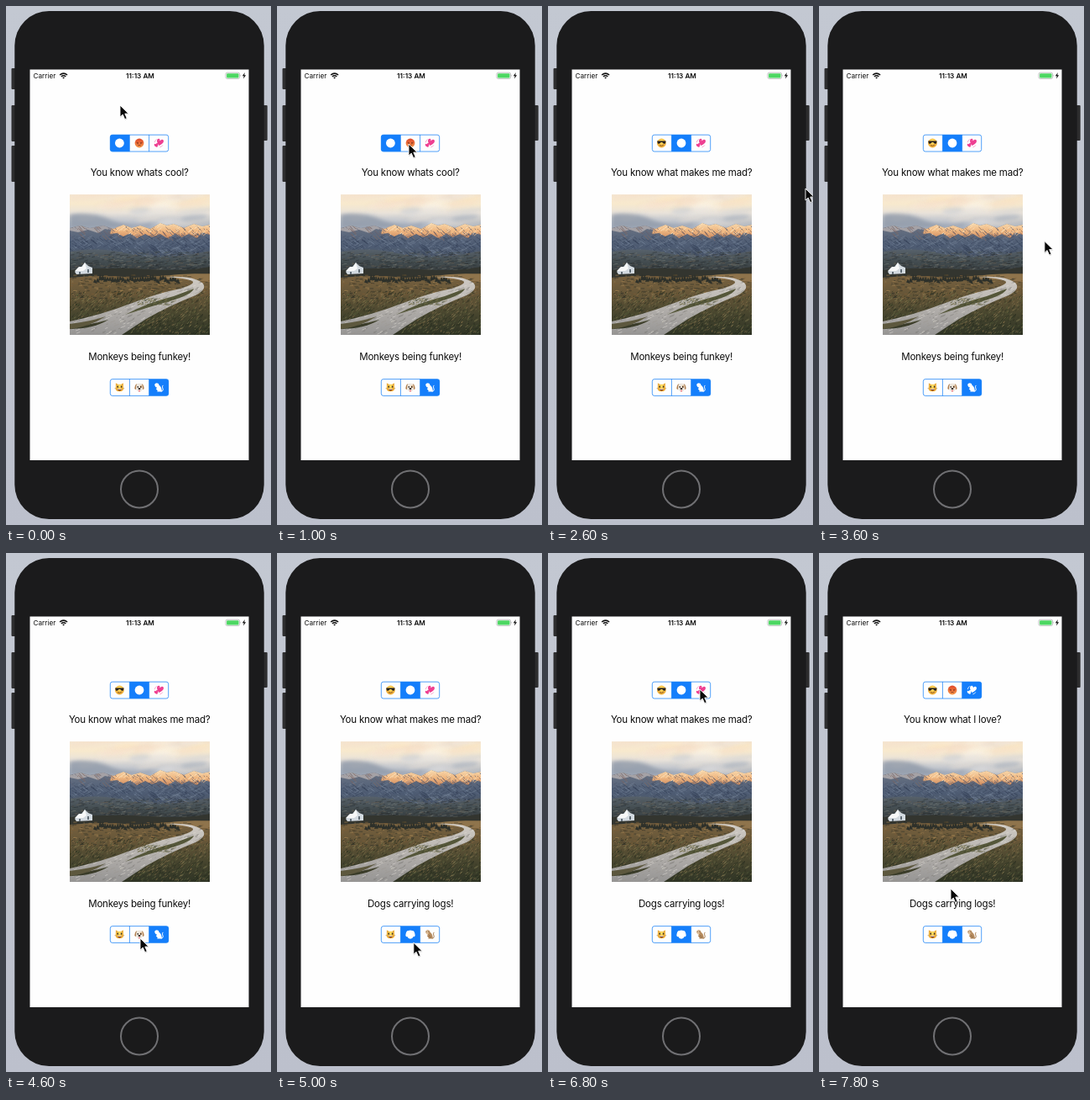
Animation of 316 by 617 pixels, one loop 8 s. Source, as an HTML page with a canvas:

```html
<!DOCTYPE html>
<html lang="en">
<head>
<meta charset="utf-8">
<title>Segmented pickers</title>
<style>
html, body { margin: 0; width: 100%; height: 100%; overflow: hidden; background: #bfc4cf; }
svg, canvas { position: absolute; left: 0; top: 0; display: block; }
#photo { left: 76px; top: 224px; }
text { font-family: Inter, Roboto, sans-serif; fill: #0c0c0c; }
.label { font-size: 11.5px; letter-spacing: -.2px; text-anchor: middle; }
.status { font-size: 8.2px; }
.cell { fill: #fefefe; }
.on .cell { fill: #147efb; }
.on .base { fill: #fff; stroke: none; }
.on .tail { stroke: #fff; }
.on .detail { display: none; }
</style>
</head>
<body>
<svg width="316" height="617" viewBox="0 0 316 617">
  <defs>
    <linearGradient id="backdrop" x2="0" y2="1">
      <stop stop-color="#c3c8d2"/><stop offset="1" stop-color="#bcc0cc"/>
    </linearGradient>
    <radialGradient id="yellow" cy=".35">
      <stop stop-color="#ffe368"/><stop offset="1" stop-color="#f0b03a"/>
    </radialGradient>
    <linearGradient id="red" x2="0" y2="1">
      <stop stop-color="#e0472b"/><stop offset="1" stop-color="#f79a4c"/>
    </linearGradient>
    <clipPath id="pill"><rect width="70" height="20" rx="3"/></clipPath>
    <path id="heart" d="M0 4C-6-.5-4-4.5-1.7-3.8Q-.4-3.4 0-2Q.4-3.4 1.7-3.8C4-4.5 6-.5 0 4Z"/>
  </defs>
  <rect width="316" height="617" fill="url(#backdrop)"/>

  <g fill="#2d2d2e">
    <rect x="6.5" y="74" width="8" height="25" rx="1"/>
    <rect x="6.5" y="118" width="8" height="43" rx="1"/>
    <rect x="6.5" y="166" width="8" height="43" rx="1"/>
    <rect x="304" y="118" width="7.7" height="42" rx="1"/>
  </g>
  <rect x="10.3" y="6" width="297.4" height="604" rx="41" fill="#1b1b1c"/>
  <rect x="28.5" y="75.5" width="261" height="464.5" fill="#fefefe"/>
  <circle cx="159" cy="574.5" r="22" fill="#1a1a1b" stroke="#707073" stroke-width="2"/>

  <text class="status" x="32.5" y="86">Carrier</text>
  <g transform="translate(68.6 86.5)" fill="none" stroke="#111" stroke-width="1.5">
    <path d="M-4.5-4.5Q0-8.3 4.5-4.5M-2.7-2.6Q0-5 2.7-2.6"/>
    <path d="M0 0L-1.4-1.4Q0-2.6 1.4-1.4Z" fill="#111" stroke="none"/>
  </g>
  <text class="status" x="160" y="86" text-anchor="middle" font-weight="600">11:13 AM</text>
  <rect x="262" y="79.2" width="16.6" height="7.2" rx="1.8" fill="#fff" stroke="#a7a9a9" stroke-width=".7"/>
  <rect x="263.1" y="80.2" width="14.4" height="5.2" rx="1" fill="#4cd762"/>
  <path d="M279.5 81.5q1.4 1.3 0 2.6z" fill="#a7a9a9"/>
  <path d="M284.8 79l-3 4.3h1.9l-.7 3.3 3.1-4.4h-1.9z" fill="#111"/>

  <text class="label" id="moodText" x="159.2" y="202.2"/>
  <text class="label" id="petText" x="159.2" y="421.4"/>

  <g id="moods" transform="translate(124 153)"><g clip-path="url(#pill)">
    <g>
      <rect class="cell" width="23.5" height="20"/>
      <g transform="translate(11.4 10)">
        <circle class="base" r="5.4" fill="url(#yellow)"/>
        <g class="detail">
          <path d="M-5.3-2.4H5.3L4.4.4Q2.4 1.6.8-.9H-.8Q-2.4 1.6-4.4.4Z" fill="#25201d"/>
          <path d="M-2.4 2.6Q.3 4.2 2.5 2.1" fill="none" stroke="#734019" stroke-width=".8"/>
        </g>
      </g>
    </g>
    <g>
      <rect class="cell" x="23.3" width="23.5" height="20"/>
      <g transform="translate(35 10)">
        <circle class="base" r="5.4" fill="url(#red)"/>
        <g class="detail" stroke="#6d2514" fill="none">
          <path d="M-3.4-1L-1-.1M3.4-1L1-.1M-1.7 3Q0 1.8 1.7 3" stroke-width=".7"/>
          <path d="M-2 .2v1M2 .2v1" stroke-width="1"/>
        </g>
      </g>
    </g>
    <g>
      <rect class="cell" x="46.7" width="23.5" height="20"/>
      <g transform="translate(58.2 10)" fill="#ee3f91">
        <use class="base" href="#heart" transform="translate(1.4 -.9) rotate(14)"/>
        <use class="base" href="#heart" transform="translate(-2.8 2.6) rotate(-18) scale(.6)"/>
        <path class="tail" d="M-4.9-.8Q-4.4-3.6-2.6-4.6M4.6 2.4Q3.6 4.5 1.2 4.8" fill="none" stroke="#f590bf" stroke-width=".8"/>
        <path class="detail" d="M.2-3q.8-1 1.8-.3" fill="none" stroke="#ffb4d7" stroke-width=".8"/>
      </g>
    </g>
  </g></g>

  <g id="pets" transform="translate(124 443.5)"><g clip-path="url(#pill)">
    <g>
      <rect class="cell" width="23.5" height="20"/>
      <g transform="translate(11.4 10)">
        <path class="base" d="M-4.6-1L-4.5-5.2L-1.8-3.8H1.8L4.5-5.2L4.6-1Q6 4.8 0 4.8Q-6 4.8-4.6-1Z" fill="url(#yellow)"/>
        <g class="detail">
          <path d="M-3.8-4.2L-3.7-2.5L-2.6-3.2ZM3.8-4.2L3.7-2.5L2.6-3.2Z" fill="#d18a53"/>
          <ellipse cx="-2.2" cy="-.8" rx=".8" ry="1.1" fill="#30251b"/>
          <ellipse cx="2.2" cy="-.8" rx=".8" ry="1.1" fill="#30251b"/>
          <path d="M-2.5 1.7H2.5Q1.8 4 0 4Q-1.8 4-2.5 1.7Z" fill="#77351f"/>
          <path d="M-2 1.8H2V2.4H-2Z" fill="#fff"/>
          <path d="M-5.9 1l2 .3M5.9 1l-2 .3" stroke="#8d6738" stroke-width=".4"/>
        </g>
      </g>
    </g>
    <g>
      <rect class="cell" x="23.3" width="23.5" height="20"/>
      <g transform="translate(35 10)">
        <path class="base" d="M-2.6-4.4Q0-5.5 2.6-4.4Q5-4.4 5.7 1Q5.3 3.2 3.7 2.6Q2.6 5.2 0 5.2Q-2.6 5.2-3.7 2.6Q-5.3 3.2-5.7 1Q-5-4.4-2.6-4.4Z" fill="#eee8df"/>
        <g class="detail">
          <path d="M-2.9-4.2Q-5-4-5.6 1Q-5 3-4 2Q-4.4-1-2.9-4.2ZM2.9-4.2Q5-4 5.6 1Q5 3 4 2Q4.4-1 2.9-4.2Z" fill="#b07f50"/>
          <ellipse cx="2" cy="-1" rx="1.4" ry="1.8" fill="#d9b287"/>
          <circle cx="-1.8" cy="-.6" r=".8" fill="#241b17"/>
          <circle cx="1.8" cy="-.6" r=".8" fill="#241b17"/>
          <ellipse cy="1.5" rx="1.4" ry=".9" fill="#241b17"/>
          <path d="M-.8 3.2h1.6v1.2q-.8 1-1.6 0z" fill="#e96572"/>
        </g>
      </g>
    </g>
    <g>
      <rect class="cell" x="46.7" width="23.5" height="20"/>
      <g transform="translate(58.2 10)">
        <path class="tail" d="M2.5 4.6Q5.8 4.4 4.8 1.4Q3.6-1 5-2.6" fill="none" stroke="#a87d52" stroke-width="1"/>
        <path class="base" d="M-5-3.4Q-4.6-5.4-2.2-5.3Q.3-5.1.3-2.7Q3.6-.6 3.6 4.9H-2L-1.4 3.7L-3.4 1.8L-2 .2Q-4.8-.4-5-3.4Z" fill="#b68c5f"/>
        <g class="detail">
          <ellipse cx="-2.9" cy="-2.4" rx="1.6" ry="2" fill="#e9c79f"/>
          <circle cx="-3.4" cy="-3" r=".4" fill="#2d2018"/>
          <circle cx="-2" cy="-3" r=".4" fill="#2d2018"/>
          <path d="M-.5.6Q1.5 2-1.8 2.8M.2 4.5Q.2 2.8 2 2.6" fill="none" stroke="#7a5636" stroke-width=".5"/>
        </g>
      </g>
    </g>
  </g></g>

  <g fill="none" stroke="#2588f7" stroke-width=".8">
    <path d="M147.4 153v20M170.6 153v20M147.4 443.5v20M170.6 443.5v20"/>
    <rect x="124.3" y="153.2" width="69.4" height="19.8" rx="2.6"/>
    <rect x="124.3" y="443.6" width="69.4" height="19.8" rx="2.6"/>
  </g>
</svg>
<canvas id="photo" width="167" height="167"></canvas>
<svg width="316" height="617" viewBox="0 0 316 617">
  <g id="cursor">
    <path d="M0 0V14L3.2 11L5.7 16.6L8.2 15.5L5.8 10H10.2Z" transform="translate(.4 1)" fill="#0003"/>
    <path d="M0 0V14L3.2 11L5.7 16.6L8.2 15.5L5.8 10H10.2Z" fill="#080808" stroke="#fff" stroke-width=".9"/>
  </g>
</svg>
<script>
const byId = id => document.getElementById(id);

function paintPhoto() {
  const ctx = byId('photo').getContext('2d');
  let seed = 7;
  const random = () => (seed = seed * 16807 % 2147483647) / 2147483647;
  const pick = list => list[Math.floor(random() * list.length)];
  const fill = (path, color) => { ctx.fillStyle = color; ctx.fill(new Path2D(path)); };
  const fade = (top, bottom, ...colors) => {
    const gradient = ctx.createLinearGradient(0, top, 0, bottom);
    colors.forEach((c, i) => gradient.addColorStop(i / (colors.length - 1), c));
    return gradient;
  };
  // Scatter short strokes of the given colours over a band; slope tilts them.
  const speckle = (count, x, y, w, h, colors, alpha, length = 2, slope = 0) => {
    ctx.globalAlpha = alpha;
    for (let i = 0; i < count; i++) {
      const left = x + random() * w, top = y + random() * h, run = 1 + random() * length;
      ctx.strokeStyle = pick(colors);
      ctx.beginPath();
      ctx.moveTo(left, top);
      ctx.lineTo(left + run, top + run * slope);
      ctx.stroke();
    }
    ctx.globalAlpha = 1;
  };
  const clouds = (count, y, h, colors) => {
    for (let i = 0; i < count; i++) {
      ctx.fillStyle = pick(colors);
      ctx.beginPath();
      ctx.ellipse(random() * 167, y + random() * h, 10 + random() * 18, 1.5 + random() * 3, -.12, 0, 7);
      ctx.fill();
    }
  };

  // Sky and clouds
  fill('M0 0H167V60H0Z', fade(0, 44, '#f5e6d2', '#f8e9cd', '#e9e3da', '#bcc1ca', '#a0acbf'));
  ctx.filter = 'blur(2px)';
  ctx.globalAlpha = .45;
  clouds(18, 0, 17, ['#ffe9ba', '#f6dcc6', '#fdf6ea', '#e9d9cc']);
  clouds(16, 19, 16, ['#e4e2e0', '#98a4b5', '#c6c9d0', '#f0e5d6']);
  ctx.globalAlpha = .8;
  fill('M0 24Q25 20 48 30T100 34L95 38L50 40H0Z', '#8f99a8');
  ctx.globalAlpha = 1;
  ctx.filter = 'none';

  // Mountains with sunlit snow
  const ridge = 'M0 40L12 37L24 40L40 37L52 41L64 36L74 40L84 37L96 41L108 34L116 37L124 35L136 40L148 35L158 38L167 36';
  const slopes = new Path2D(ridge + 'V92H0Z');
  ctx.fillStyle = fade(38, 86, '#6a7282', '#5a677c', '#4d5b72', '#505b68', '#414a52');
  ctx.fill(slopes);
  ctx.save();
  ctx.clip(slopes);
  fill('M0 34H60L52 43L42 41L34 46L22 42L10 45L0 43Z', '#a5a2a6');
  fill('M52 32H167V48L158 45L152 52L142 47L133 51L126 46L118 53L108 47L98 51L90 47L80 52L72 46L64 50L56 46L48 47Z', fade(34, 52, '#f8dcb2', '#efb781', '#d08e62'));
  speckle(120, 0, 37, 167, 13, ['#5e6273', '#6f6268', '#84685f'], .7, 5, 1);
  speckle(90, 55, 36, 112, 13, ['#fbe0b8', '#f3c08a'], .8, 5, -.8);
  speckle(330, 0, 50, 167, 24, ['#323f56', '#75839a', '#5f6d84', '#2c394e'], .5, 8, .7);
  speckle(200, 0, 50, 167, 24, ['#3a475e', '#7b879b', '#4a566d'], .5, 7, -.5);
  ctx.restore();
  fill('M0 68Q35 62 72 71T167 67V98H0Z', fade(64, 96, '#59636d', '#434c50', '#303536'));
  speckle(520, 0, 69, 167, 25, ['#23292d', '#7c807b', '#4d5858', '#2a2d2c', '#665f52'], .5, 6, -.15);

  // Tree line and fields
  fill('M0 90Q50 86 95 89T167 86V105H0Z', '#33352f');
  fill('M0 99Q40 95 78 99L118 96L167 94V167H0Z', fade(94, 167, '#7a6341', '#665638', '#47452e', '#2f3425'));
  fill('M112 97Q140 93 167 95V104Q140 100 112 101Z', '#8f744c');
  speckle(360, 0, 96, 167, 28, ['#a18150', '#463f2c', '#7c5e38', '#33342a'], .65, 4);
  speckle(1200, 0, 116, 167, 51, ['#1f261a', '#7f7a52', '#59623d', '#947a50', '#2c3222'], .6, 2, -.8);
  for (let x = 28; x < 128; x += 3) {
    fill(`M${x} ${102 + random() * 3}l2 -${4 + random() * 4}l3 ${4 + random() * 4}z`, '#2d302a');
  }

  // House
  fill('M6 92L10 87L14 86L18 81L22 85L27 87V94L8 95Z', '#d3dae0');
  fill('M6 91L11 86L15 86L18 81L20 88L16 91Z', '#f7f8f8');
  fill('M11 92h2v3h-2zM21 89h2v4h-2z', '#606b74');

  // Road with a grassy middle
  const road = 'M0 151Q38 143 72 130T132 112Q151 106 146 103Q137 99 113 98Q147 96 158 105Q165 112 150 120Q119 132 91 148L62 167H0V160Q28 160 46 149Q24 155 0 158Z';
  fill(road, fade(98, 167, '#cfcac3', '#c0bcb7', '#aaa7a4', '#969594'));
  ctx.save();
  ctx.clip(new Path2D(road));
  speckle(500, 0, 100, 160, 67, ['#e6e2dc', '#75746f', '#99948c'], .45, 5, -.4);
  ctx.restore();
  fill('M66 143Q92 129 124 121L148 112Q146 119 119 127Q94 134 66 143Z', '#55573a');
  fill('M0 154Q25 151 43 145Q22 158 0 160Z', '#5d583e');
  speckle(100, 80, 124, 44, 8, ['#3d432b', '#7c754c'], .55, 3, -.4);
}

const moodLines = ['You know whats cool?', 'You know what makes me mad?', 'You know what I love?'];
const petLines = ['Cats wearing hats!', 'Dogs carrying logs!', 'Monkeys being funkey!'];

// Pointer stops: time, x, y
const stops = [
  [0, 136, 118], [1000, 157, 164], [1400, 157, 164], [2400, 250, 202], [2600, 307, 217],
  [3200, 307, 217], [4400, 160, 458], [4800, 160, 458], [5400, 171, 478], [5800, 171, 478],
  [6800, 181, 162], [7000, 181, 162], [7800, 157, 399]
];

function pointerAt(time) {
  const next = stops.findIndex(stop => stop[0] >= time);
  if (next < 1) return stops[0].slice(1);
  const [t0, x0, y0] = stops[next - 1], [t1, x1, y1] = stops[next];
  const p = (time - t0) / (t1 - t0), eased = p * p * (3 - 2 * p);
  return [x0 + (x1 - x0) * eased, y0 + (y1 - y0) * eased];
}

function select(name, lines, index) {
  [...byId(name + 's').firstElementChild.children].forEach((cell, i) => cell.classList.toggle('on', i === index));
  byId(name + 'Text').textContent = lines[index];
}

const start = performance.now();
function draw(now) {
  const time = Math.floor(Math.max(0, now - start) % 8000 / 200) * 200;
  select('mood', moodLines, time < 1200 ? 0 : time < 7000 ? 1 : 2);
  select('pet', petLines, time < 4800 ? 2 : 1);
  byId('cursor').setAttribute('transform', `translate(${pointerAt(time)})`);
  requestAnimationFrame(draw);
}

paintPhoto();
draw(start);
</script>
</body>
</html>
```
